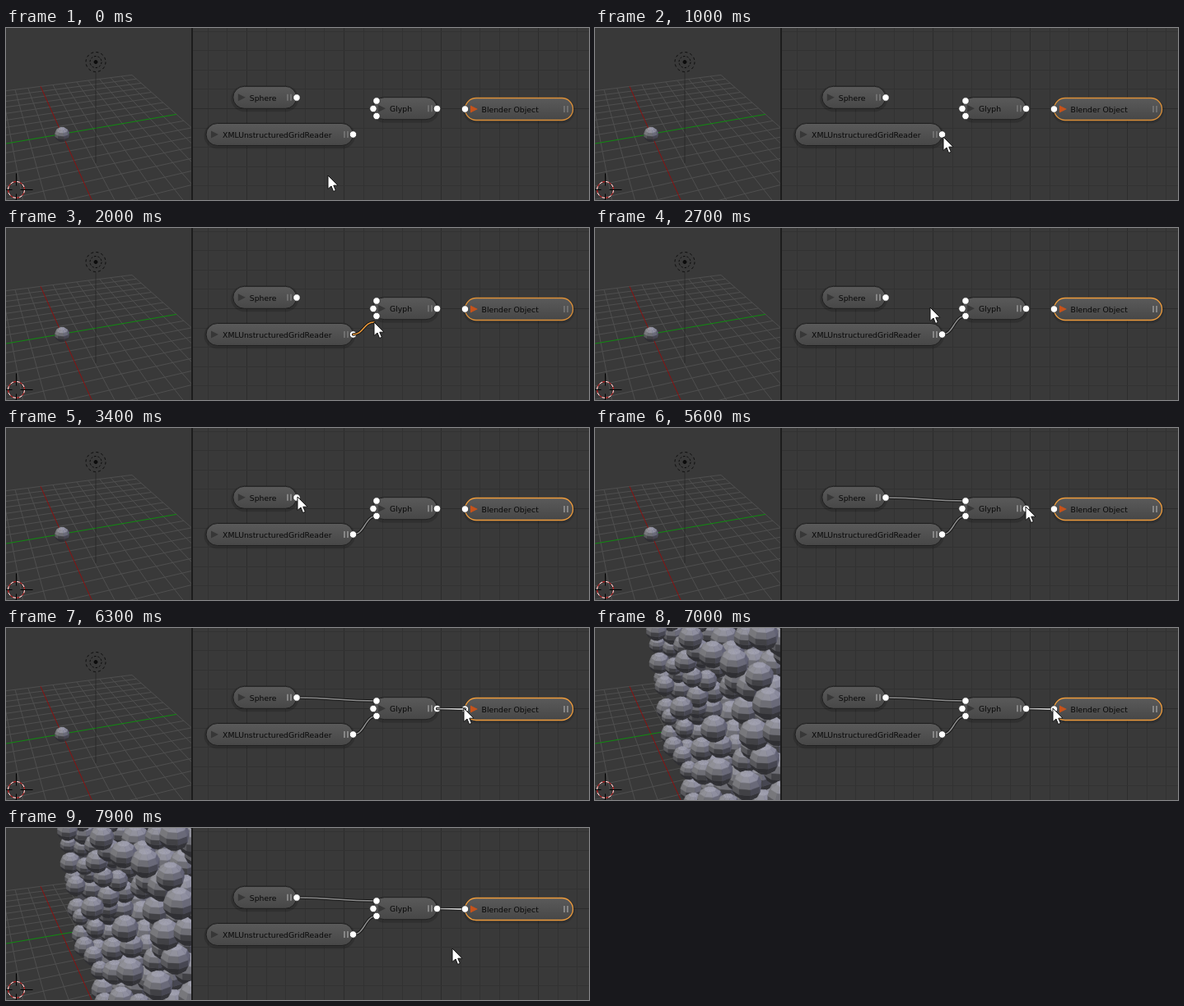
Write an HTML page that moves like this. It is 708 by 210 pixels and loops after 8 s.

```html
<!DOCTYPE html>
<html lang="en">
<head>
<meta charset="utf-8">
<title>Node editor</title>
<style>
  html, body { margin: 0; width: 100%; height: 100%; overflow: hidden; background: #393939; }
  svg { display: block; width: 708px; height: 210px; }
  text { font: 9.32px "DejaVu Sans", sans-serif; fill: #080808; }
  .socket { fill: #fff; stroke: #222; stroke-width: .7; }
  .shade { fill: none; stroke: #000; }
  .pause { stroke: #808080; stroke-width: 1.3; }
  .linked .pause { stroke: #868686; stroke-width: 2; }
  .active { stroke: #dc9038; }
  .linked .active { stroke: #ee9c3c; }
  .link path { fill: none; stroke-linecap: round; }
  .link .rim { stroke: #151515; stroke-width: 3.4; }
  .link .core { stroke: #8e8e8e; stroke-width: 1.5; }
  .pointer { fill: #fff; stroke: #111; stroke-width: 1; stroke-linejoin: round; }
</style>
</head>
<body>
<svg id="stage" viewBox="0 0 708 210">
  <defs>
    <linearGradient id="body" x2="0" y2="1">
      <stop offset="0" stop-color="#5a5a5a"/><stop offset="1" stop-color="#474747"/>
    </linearGradient>
    <linearGradient id="toActive" gradientUnits="userSpaceOnUse" x1="523" x2="557" y1="0" y2="0">
      <stop offset="0" stop-color="#a0a0a0"/><stop offset="1" stop-color="#fff"/>
    </linearGradient>
    <clipPath id="view"><rect width="225" height="210"/></clipPath>
    <g id="ball"></g>
  </defs>

  <g clip-path="url(#view)">
    <rect width="225" height="210" fill="#393939"/>
    <g id="floor" fill="none" transform="translate(0 -.6)"></g>
    <g id="before">
      <use href="#ball" transform="translate(68 130) scale(9)"/>
      <g fill="none" stroke="#0c0c0c">
        <path d="M109 54V165" stroke="#262626" stroke-width=".8"/>
        <circle cx="109" cy="41.500" r="12" stroke-dasharray="3.1 3.180"/>
        <circle cx="109" cy="41.500" r="7" stroke-dasharray="2.5 1.900"/>
        <circle cx="109" cy="41.500" r="2" fill="#0c0c0c"/>
      </g>
    </g>
    <g id="after"></g>
    <g fill="none" transform="translate(12.500 197.500)">
      <circle r="10" stroke="#e01818"/>
      <circle r="10" stroke="#fff" stroke-dasharray="3.927"/>
      <path d="M-20 0H-5M5 0H20M0 -20V-5M0 5V20" stroke="#000"/>
    </g>
  </g>

  <rect x="227" width="481" height="210" fill="#393939"/>
  <g id="sheet"></g>
  <rect x="225" width="2" height="210" fill="#1c1c1c"/>
  <g id="links"></g>
  <g id="nodes"></g>
  <g id="drag" class="link"><path class="rim"/><path class="core"/></g>
  <path id="arrow" class="pointer" d="M0 0V16.500L4 13 6.600 19.500 9.400 18.300 6.800 12.200H12Z"/>
  <path id="resize" class="pointer" d="M-9 0L-4-5V-1.800H4V-5L9 0 4 5V1.800H-4V5Z"/>
</svg>

<script>
const $ = id => document.getElementById(id);

function add(parent, tag, attrs, text) {
  const el = document.createElementNS('http://www.w3.org/2000/svg', tag);
  for (const k in attrs) el.setAttribute(k, attrs[k]);
  if (text) el.textContent = text;
  parent.appendChild(el);
  return el;
}

let seed = 11;
const rand = () => (seed = (seed * 16807) % 2147483647) / 2147483647;

const mix = (a, b, k) => a + (b - a) * k;

// Piecewise linear lookup in rows of [key, ...values]
function lookup(rows, key) {
  let i = 0;
  while (i < rows.length - 2 && key > rows[i + 1][0]) i++;
  const [a, b] = [rows[i], rows[i + 1]];
  const k = Math.min(1, Math.max(0, (key - a[0]) / (b[0] - a[0])));
  return a.slice(1).map((v, j) => mix(v, b[j + 1], k));
}

// Perspective floor; u and v run from -1 to 1
function project(u, v) {
  const w = 1 + .118 * u + .31 * v;
  return [(163.4 * u - 13 * v + 68) / w, (-11.5 * u - 35.7 * v + 130) / w];
}
function floorLine(a, b, stroke) {
  add($('floor'), 'path', { d: `M${project(...a)}L${project(...b)}`, stroke, 'stroke-width': 1 });
}
for (let i = -8; i <= 8; i++) {
  if (!i) continue;
  floorLine([i / 8, -1], [i / 8, 1], '#4f4f4f');
  floorLine([-1, i / 8], [1, i / 8], '#4f4f4f');
}
floorLine([0, -1], [0, 1], '#8c1010');
floorLine([-1, 0], [1, 0], '#108c10');

// Unit ball with flat facets, lit by a white key and a bluish fill light
function buildBall() {
  const tilt = .5, turn = .25, n = 8;
  const key = [-.48, .7, .53], fill = [.75, .59, .32];
  const point = (i, j) => {
    const th = turn + i * 2 * Math.PI / n, ph = (j / 7 - .5) * Math.PI;
    const x = Math.cos(ph) * Math.cos(th), y = Math.cos(ph) * Math.sin(th), z = Math.sin(ph);
    return [x, y * Math.sin(tilt) + z * Math.cos(tilt), z * Math.sin(tilt) - y * Math.cos(tilt)];
  };
  for (let i = 0; i < n; i++) for (let j = 0; j < 7; j++) {
    const quad = [point(i, j), point(i + 1, j), point(i + 1, j + 1), point(i, j + 1)];
    const sum = [0, 1, 2].map(c => quad.reduce((s, p) => s + p[c], 0));
    if (sum[2] < -.1) continue;
    const lit = dir => Math.max(0, sum.reduce((s, v, c) => s + v * dir[c], 0) / Math.hypot(...sum));
    const tone = blue => Math.round(47 + 112 * (.8 * lit(key) + blue * lit(fill)));
    const color = `rgb(${tone(.48)},${tone(.48)},${tone(.62) + 4})`;
    add($('ball'), 'polygon', {
      points: quad.map(p => `${p[0].toFixed(3)},${(-p[1]).toFixed(3)}`).join(' '),
      fill: color, stroke: color, 'stroke-width': .03
    });
  }
}
buildBall();

// Heap of balls: its left edge by height, larger towards the right
const heapEdge = [[0, 74], [20, 73], [70, 82], [105, 87], [150, 94], [170, 113], [215, 118]];
function buildHeap() {
  const edge = y => lookup(heapEdge, y)[0];
  let d = 'M230 0V210';
  for (let y = 210; y >= 0; y -= 10) d += `L${edge(y) + 3} ${y}`;
  add($('after'), 'path', { d, fill: '#47474e' });
  const balls = [];
  for (let y = -8; y < 228; y += 17) {
    for (let x = edge(y) + rand() * 3; x < 244;) {
      const r = 9 + (x - 70) / 155 * 8 + rand() * 4;
      balls.push({ x, y: y + (rand() - .5) * 13, r, depth: r + rand() * 9 });
      x += r * 1.25 + rand() * 5;
    }
  }
  balls.sort((a, b) => a.depth - b.depth);
  for (const b of balls) {
    add($('after'), 'use', {
      href: '#ball',
      transform: `translate(${b.x.toFixed(1)} ${b.y.toFixed(1)}) scale(${b.r.toFixed(1)})`
    });
  }
}
buildHeap();

// Node sheet grid, every fifth line stronger
function sheetLines(start, end, major, path) {
  for (let i = -10; i < 20; i++) {
    const at = Math.round(major + i * 23.6) + .5;
    if (at < start || at > end) continue;
    add($('sheet'), 'path', { d: path(at), stroke: i % 5 ? '#323232' : '#2c2c2c' });
  }
}
sheetLines(228, 708, 410, x => `M${x} 0V210`);
sheetLines(0, 210, 98, y => `M227 ${y}H708`);

function addNode(x, y, w, label, sockets, active) {
  const g = add($('nodes'), 'g', {});
  const box = { x: x + .5, y, width: w - 1, height: 27, rx: 13.5 };
  add(g, 'rect', { ...box, y: y + 1.5, class: 'shade', 'stroke-width': 5, opacity: .16 });
  add(g, 'rect', {
    ...box, fill: 'url(#body)', stroke: '#202020',
    'stroke-width': active ? 1.3 : 1, class: active ? 'active' : ''
  });
  const mid = y + 13.5, left = x + (active ? 7 : 6.5);
  add(g, 'path', {
    d: `M${left} ${mid - 4.5}L${left + 9} ${mid}L${left} ${mid + 4.5}Z`,
    fill: active ? '#c4531c' : '#373737'
  });
  add(g, 'text', { x: x + 20.5, y: mid + 4 }, label);
  const bar = Math.round(x + w) - 11;
  add(g, 'path', { class: 'pause', fill: 'none', d: `M${bar} ${mid - 4}v8m4 0v-8` });
  for (const [cx, cy] of sockets) add(g, 'circle', { class: 'socket', cx, cy, r: 4.2 });
}
addNode(275.3, 71.3, 78, 'Sphere', [[353, 85]]);
addNode(242.5, 116.5, 179.5, 'XMLUnstructuredGridReader', [[421.5, 130]]);
addNode(445.5, 84.7, 78.5, 'Glyph', [[450, 89], [446, 98.5], [450, 107.5], [523.5, 98.5]]);
addNode(557, 85.5, 132, 'Blender Object', [[557.5, 99]], true);

function curve([x1, y1], [x2, y2]) {
  const h = Math.abs(x2 - x1) / 2;
  return `M${x1} ${y1}C${x1 + h} ${y1} ${x2 - h} ${y2} ${x2} ${y2}`;
}

// Each link is pulled out, snaps to its socket, then is dropped
const links = [
  { from: [421.5, 130], to: [450, 107.5], pull: 1600, snap: 2100, drop: 2400 },
  { from: [353, 85], to: [450, 89], pull: 3700, snap: 4100, drop: 4600 },
  { from: [523.5, 98.5], to: [557.5, 99], pull: 5800, snap: 6200, drop: 7000, paint: 'url(#toActive)' }
];
for (const l of links) {
  l.el = add($('links'), 'g', { class: 'link' });
  add(l.el, 'path', { class: 'rim', d: curve(l.from, l.to) });
  const core = add(l.el, 'path', { class: 'core', d: curve(l.from, l.to) });
  if (l.paint) core.style.stroke = l.paint;
}

// Pointer tip: time, x, y
const track = [
  [300, 391, 180], [1000, 423, 133], [1100, 423, 133], [1200, 423, 131], [1500, 423, 131],
  [2000, 447, 115], [2200, 447, 108], [2300, 447, 108], [3200, 356, 83], [3300, 356, 83],
  [3400, 354, 84], [3600, 354, 84], [4200, 451, 82], [4500, 451, 82], [4800, 508, 97],
  [5200, 517, 96], [5400, 517, 96], [5600, 523, 96], [5700, 523, 96], [6300, 556, 98],
  [7000, 556, 98], [7800, 542, 145], [7900, 542, 147]
];

const show = (el, on) => { el.style.display = on ? '' : 'none'; };
const [dragRim, dragCore] = $('drag').children;

function draw(t) {
  const tip = lookup(track, t).map(Math.round);
  const resizing = t >= 4800 && t < 5200;
  show($('arrow'), !resizing);
  show($('resize'), resizing);
  for (const id of ['arrow', 'resize']) $(id).setAttribute('transform', `translate(${tip})`);

  $('nodes').classList.toggle('linked', t >= 2400);
  show($('before'), t < 7000);
  show($('after'), t >= 7000);

  for (const l of links) show(l.el, t >= l.drop);
  const held = links.find(l => t >= l.pull && t < l.drop);
  show($('drag'), held);
  if (held) {
    const snapped = t >= held.snap;
    const d = curve(held.from, snapped ? held.to : tip);
    dragRim.setAttribute('d', d);
    dragCore.setAttribute('d', d);
    dragCore.style.stroke = snapped ? held.paint || '#a0a0a0' : '#ee9c3c';
  }
}

const start = performance.now();
function tick() {
  const t = (performance.now() - start) % 8000;
  draw(Math.floor(t / 100) * 100);
  requestAnimationFrame(tick);
}
tick();
</script>
</body>
</html>
```
